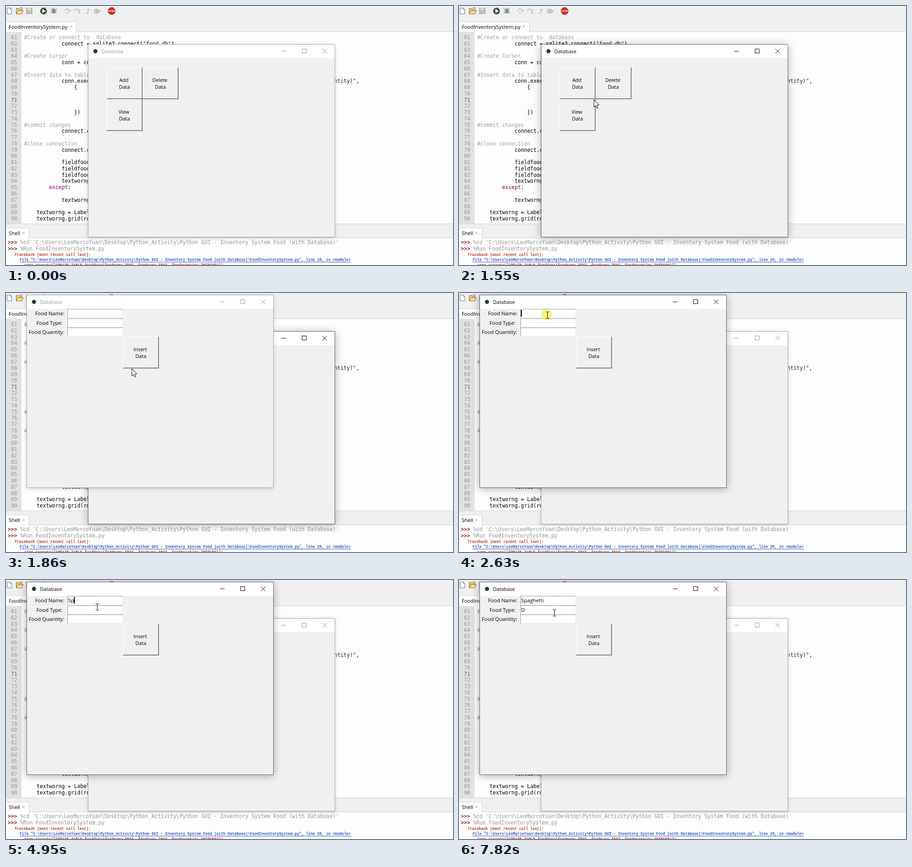
Recreate the animation shown at these times as an HTML page with a canvas. Size 982 px wide and 570 px high, loop 8 s.

```html
<!DOCTYPE html>
<html lang="en">
<head>
<meta charset="utf-8">
<title>Inventory form</title>
<style>
html, body { margin: 0; width: 100%; height: 100%; overflow: hidden; background: #f0f0f0; }
canvas { display: block; width: 982px; height: 570px; }
</style>
</head>
<body>
<canvas id="stage" width="982" height="570"></canvas>
<script>
const W = 982, H = 570, LOOP = 8000, STEP = 76;
const UI = '"Open Sans", "Noto Sans", sans-serif';
const MONO = '"DejaVu Sans Mono", "Noto Sans Mono", monospace';
const CODE = '11.42px ' + MONO;
const SMALL = 'bold 8.2px "Liberation Mono", monospace';
const WIN_W = 542, WIN_H = 424;
const MAIN = { x: 181, y: 85 }, FORM = { x: 46, y: 5 };

const stage = document.getElementById('stage').getContext('2d');
const layer = () => Object.assign(document.createElement('canvas'), { width: W, height: H }).getContext('2d');

function box(c, x, y, w, h, color) {
  c.fillStyle = color;
  c.fillRect(x, y, w, h);
}

function text(c, str, x, y, color, font, align = 'left') {
  c.font = font;
  c.fillStyle = color;
  c.textAlign = align;
  c.fillText(str, x, y);
}

function path(c, pts, close) {
  c.beginPath();
  pts.forEach(([x, y]) => c.lineTo(x, y));
  if (close) c.closePath();
}

function line(c, pts, color, width = 1) {
  path(c, pts);
  c.strokeStyle = color;
  c.lineWidth = width;
  c.stroke();
}

function shape(c, pts, fill, stroke, width = 1) {
  path(c, pts, true);
  c.fillStyle = fill;
  c.fill();
  if (!stroke) return;
  c.strokeStyle = stroke;
  c.lineWidth = width;
  c.stroke();
}

function disc(c, x, y, r, color) {
  c.beginPath();
  c.arc(x, y, r, 0, Math.PI * 2);
  c.fillStyle = color;
  c.fill();
}

function cross(c, x, y, r, color) {
  line(c, [[x - r, y - r], [x + r, y + r]], color);
  line(c, [[x + r, y - r], [x - r, y + r]], color);
}

// ---- editor behind the windows ----

const KEY = '#7f0055', STR = '#14301a', NOTE = '#a0a0a0', INK = '#000';
const CURRENT_LINE = 71;
const code = [
  [61, 0, '#Create or connect to  database', NOTE],
  [62, 12, 'connect = sqlite3.connect(', INK],
  [62, 38, '"food.db"', STR],
  [62, 47, ')', INK],
  [64, 0, '#Create Cursor', NOTE],
  [65, 12, 'conn = connect.cursor()', INK],
  [67, 0, '#Insert data to table', NOTE],
  [68, 12, 'conn.execute(', INK],
  [68, 99.1, 'ntity)"', STR],
  [68, 106.1, ',', INK],
  [69, 16, '{', INK],
  [73, 16, '})', INK],
  [75, 0, '#commit changes', NOTE],
  [76, 12, 'connect.commit()', INK],
  [78, 0, '#close connection', NOTE],
  [79, 12, 'connect.close()', INK],
  [81, 12, 'fieldfoodname', INK],
  [82, 12, 'fieldfoodtype', INK],
  [83, 12, 'fieldfoodquantity', INK],
  [84, 12, 'textworng', INK],
  [85, 8, 'except', KEY],
  [85, 14, ':', INK],
  [87, 12, 'textworng', INK],
  [89, 4, 'textworng = Label(', INK],
  [90, 4, 'textworng.grid(row', INK]
];

function arrowIcon(c, x, drop) {
  c.beginPath();
  c.arc(x + 6, 11, 4.5, Math.PI, Math.PI * 1.85);
  c.strokeStyle = '#c4c4c4';
  c.lineWidth = 2;
  c.stroke();
  shape(c, [[x + 8, 9], [x + 15, 9], [x + 11.5, 14]], '#c4c4c4');
  box(c, x + drop, 14, 4, 3, '#c8c8c8');
}

function toolbar(c) {
  shape(c, [[2.5, 4.5], [9.5, 4.5], [12.5, 7.5], [12.5, 17.5], [2.5, 17.5]], '#fff', '#64788c');
  line(c, [[9.5, 4.5], [9.5, 7.5], [12.5, 7.5]], '#64788c');

  shape(c, [[22.5, 17], [22.5, 5.5], [28, 5.5], [29.5, 7.5], [35.5, 7.5], [35.5, 17]], '#f0c878', '#8a6420');
  shape(c, [[22.5, 17.5], [26.5, 10.5], [38, 10.5], [34.5, 17.5]], '#ffe2a0', '#8a6420');
  line(c, [[30, 5], [33, 3.5], [36, 6]], '#4b6d98', 1.3);

  box(c, 44, 4, 14, 14, '#b5b5b5');
  box(c, 47, 5, 8, 5, '#dedede');
  box(c, 47, 12, 8, 6, '#cacaca');
  box(c, 48, 13, 2, 4, '#a4a4a4');

  disc(c, 82.5, 11, 7.5, '#44523f');
  shape(c, [[80, 6.5], [87, 11], [80, 15.5]], '#fff');

  for (const a of [-1, 0, 1]) line(c, [[98, 11 + a * 5], [105, 11 + a * 2], [112, 11 + a * 5]], '#4d5a65', .9);
  line(c, [[102, 4], [105, 8], [108, 4]], '#4d5a65', .9);
  c.beginPath();
  c.ellipse(105, 11.5, 3, 4.5, 0, 0, Math.PI * 2);
  c.fillStyle = '#8a9aa6';
  c.fill();
  c.strokeStyle = '#43505a';
  c.stroke();

  arrowIcon(c, 128, 4);
  arrowIcon(c, 149, 10);
  line(c, [[174, 16], [180, 16], [180, 8]], '#c4c4c4', 2);
  shape(c, [[177, 10], [185, 10], [181, 5]], '#c4c4c4');
  box(c, 194, 6, 2, 11, '#bdbdbd');
  box(c, 197, 6, 2, 11, '#bdbdbd');
  shape(c, [[200, 6], [208, 11.5], [200, 17]], '#c9c9c9', '#b5b5b5');

  const oct = [];
  for (let i = 0; i < 8; i++) {
    const a = Math.PI * (i + .5) / 4;
    oct.push([232 + 8.2 * Math.cos(a), 11 + 8.2 * Math.sin(a)]);
  }
  shape(c, oct, '#d22c20', '#9c2a20');
  text(c, 'STOP', 232, 13.2, '#fff', 'bold 5.8px ' + UI, 'center');
}

function tab(c, y, w, label) {
  box(c, 0, y, w, 23, '#fdfdfd');
  box(c, 0, y, w, 1, '#d4d4d4');
  box(c, w, y, 1, 22, '#d0d0d0');
  text(c, label, 6, y + 16, '#000', '11.2px ' + UI);
  cross(c, w - 11.5, y + 11.5, 2.5, '#a0a0a0');
}

function shell(c) {
  const dir = "C:\\Users\\LeoMarcoYuan\\Desktop\\Python_Activity\\Python GUI - Inventory System Food (with Database)";
  const cmds = ["%cd '" + dir + "'", '%Run FoodInventorySystem.py'];
  cmds.forEach((cmd, i) => {
    const y = 524 + i * 14;
    text(c, '>>>', 4, y, '#901c30', 'bold ' + CODE);
    text(c, cmd, 31, y, '#959595', CODE);
  });
  text(c, 'Traceback (most recent call last):', 19, 550, '#c4301c', SMALL);
  text(c, 'File "' + dir + '\\FoodInventorySystem.py", line 20, in <module>', 30, 561, '#2458c8', SMALL);
  box(c, 30, 563, 728, 1, '#2458c8');
  text(c, 'conn.execute("CREATE TABLE fooddata(foodname TEXT, foodtype TEXT, foodquantity INTEGER)")', 40, 573, '#c4301c', SMALL);
}

function drawEditor(c) {
  box(c, 0, 0, W, H, '#f0f0f0');
  toolbar(c);
  box(c, 0, 56, W, 1, '#d0d0d0');
  box(c, 0, 57, W, 422, '#fdfdfd');
  box(c, 0, 57, 34, 422, '#e1e1e1');
  tab(c, 34, 154, 'FoodInventorySystem.py');
  const base = n => Math.round(73 + (n - 61) * 13.76);
  for (let n = 61; n <= 90; n++) text(c, n, 11, base(n), n === CURRENT_LINE ? '#606060' : '#999', CODE);
  for (const [n, col, str, color] of code) text(c, str, 39.7 + col * 6.875, base(n), color, CODE);
  box(c, 0, 479, W, 1, '#d0d0d0');
  box(c, 0, 510, W, 1, '#d0d0d0');
  box(c, 0, 511, W, 59, '#fdfdfd');
  tab(c, 488, 50, 'Shell');
  shell(c);
}

// ---- windows ----

function frame(c, { x, y }, active) {
  c.save();
  c.shadowColor = active ? 'rgba(0,0,0,.3)' : 'rgba(0,0,0,.16)';
  c.shadowBlur = active ? 17 : 9;
  c.shadowOffsetY = 2;
  box(c, x - 1, y - 1, WIN_W + 1, WIN_H + 1, active ? '#606060' : '#a6a6a6');
  c.restore();
  box(c, x, y, WIN_W - 1, WIN_H - 1, '#f0f0f0');
  box(c, x, y, WIN_W - 1, 30, '#fff');
  const ink = active ? '#000' : '#999';
  disc(c, x + 15.5, y + 14.5, 4.5, '#2a3440');
  text(c, 'Database', x + 28.5, y + 19, ink, '11px ' + UI);
  box(c, x + 424, y + 14, 10, 1, ink);
  c.strokeStyle = ink;
  c.lineWidth = 1;
  c.strokeRect(x + 469.5, y + 9.5, 9, 9);
  cross(c, x + 519, y + 14.5, 5, ink);
}

function button(c, x, y, word, sunk) {
  const w = 79, h = 70, d = sunk ? 1 : 0;
  box(c, x, y, w, h, sunk ? '#fff' : '#696969');
  box(c, x, y, w - 1, h - 1, sunk ? '#696969' : '#fff');
  box(c, x + 1, y + 1, w - 2, h - 2, '#a0a0a0');
  if (sunk) box(c, x + 2, y + 2, w - 3, h - 3, '#f0f0f0');
  else box(c, x + 1, y + 1, w - 3, h - 3, '#f0f0f0');
  const font = '10.9px ' + UI;
  text(c, word, x + 38 + d, y + 32 + d, '#000', font, 'center');
  text(c, 'Data', x + 39.3 + d, y + 47 + d, '#000', font, 'center');
}

function drawMain(c, active, pressed) {
  frame(c, MAIN, active);
  button(c, 221, 135, 'Add', pressed);
  button(c, 300, 135, 'Delete');
  button(c, 221, 205, 'View');
}

const rows = [36, 57, 77];
const labels = [['Food Name:', 64], ['Food Type:', 67], ['Food Quantity:', 50]];

function drawForm(c, active, values, caretRow) {
  frame(c, FORM, active);
  const font = '11.3px ' + UI;
  rows.forEach((y, i) => {
    const base = y + 13;
    text(c, labels[i][0], labels[i][1], base, '#000', font);
    box(c, 135, y - 1, 122, 20, '#999');
    box(c, 136, y, 121, 19, '#e8e8e8');
    box(c, 136, y, 120, 18, '#fff');
    text(c, values[i], 136.5, base, '#000', font);
    if (caretRow === i) box(c, Math.round(136 + c.measureText(values[i]).width), y + 1, 2, 15, '#000');
  });
  button(c, 257, 96, 'Insert');
}

// ---- pointer ----

// start, end, from, to
const moves = [
  [150, 910, [866, 557], [276, 190]],
  [1310, 1380, [287, 202], [297, 213]],
  [1550, 1700, [296, 206], [291, 186]],
  [1700, 2310, [291, 186], [194, 57]],
  [2310, 2460, [194, 57], [194, 48]],
  [2780, 2940, [196, 52], [200, 58]],
  [3090, 3240, [200, 58], [200, 59]],
  [6740, 6820, [200, 60], [200, 60]],
  [6970, 7130, [203, 64], [209, 72]]
];

function pointerAt(t) {
  const m = moves.filter(m => t >= m[0]).pop();
  if (!m) return null;
  const [t0, t1, a, b] = m;
  const n = Math.max(1, Math.round((t1 - t0) / STEP));
  const k = t >= t1 ? n : Math.floor((t - t0) * n / (t1 - t0) + .05);
  let p = Math.min(1, k / n);
  if (n > 2) p = p * p * (3 - 2 * p);
  return a.map((v, i) => Math.round(v + (b[i] - v) * p));
}

function drawArrow(c, x, y) {
  const pts = [[0, 0], [0, 16], [3.7, 12.6], [6.3, 18.3], [8.8, 17.2], [6.3, 11.7], [11.3, 11.3]];
  shape(c, pts.map(([a, b]) => [x + .5 + a, y + .5 + b]), '#fff', '#000');
}

function drawBeam(c, x, y) {
  box(c, x, y - 6, 1, 13, '#000');
  for (const s of [-7, 7]) {
    box(c, x - 3, y + s, 3, 1, '#000');
    box(c, x + 1, y + s, 3, 1, '#000');
  }
}

function drawPointer(c, t) {
  const pos = pointerAt(t);
  if (!pos) return;
  const [x, y] = pos;
  const overEntry = t > 1630 && x > 135 && x < 257 && y > 35 && y < 96;
  const overCode = t < 910 && (x > 722 || y > 508);
  const beam = overEntry || overCode;
  const down = clicks.some(([a, b]) => t >= a && t < b);
  if (down) disc(c, x - (beam ? 1.5 : .5), y - .5, 11.5, 'rgba(249,243,76,.74)');
  (beam ? drawBeam : drawArrow)(c, x, y);
}

// ---- timeline ----

const clicks = [[910, 1010], [2630, 2780], [7280, 7430]];
const keys = [4570, 4950, 5120, 5350, 5500, 5650, 5810, 6040, 6190];
const blinks = [3240, 3560, 4170, 4400, 5030, 5350, 5960, 6190, 6820, 7130, 7820];
const passed = (list, t) => list.filter(v => t >= v).length;

const editor = layer(), form = layer();
drawEditor(editor);

function draw(t) {
  const focus = t >= 2630;
  stage.drawImage(editor.canvas, 0, 0);
  drawMain(stage, t >= 910 && !focus, t >= 910 && t < 1550);

  const open = Math.min(1, Math.max(0, (t - 1585) / 155));
  if (open > 0) {
    const values = ['Spaghetti'.slice(0, passed(keys, t)), t >= 7820 ? 'D' : '', ''];
    const caretOn = focus && passed(blinks, t) % 2 === 0;
    const caretRow = caretOn ? (t >= 7280 ? 1 : 0) : -1;
    form.clearRect(0, 0, W, H);
    drawForm(form, focus, values, caretRow);

    const s = 1 - .18 * (1 - open) ** 2;
    stage.save();
    stage.globalAlpha = open;
    stage.translate(317 * (1 - s), 216 * (1 - s));
    stage.scale(s, s);
    stage.drawImage(form.canvas, 0, 0);
    stage.restore();
  }
  drawPointer(stage, t);
}

const start = performance.now();
function tick() {
  draw((performance.now() - start) % LOOP);
  requestAnimationFrame(tick);
}
tick();
</script>
</body>
</html>
```
